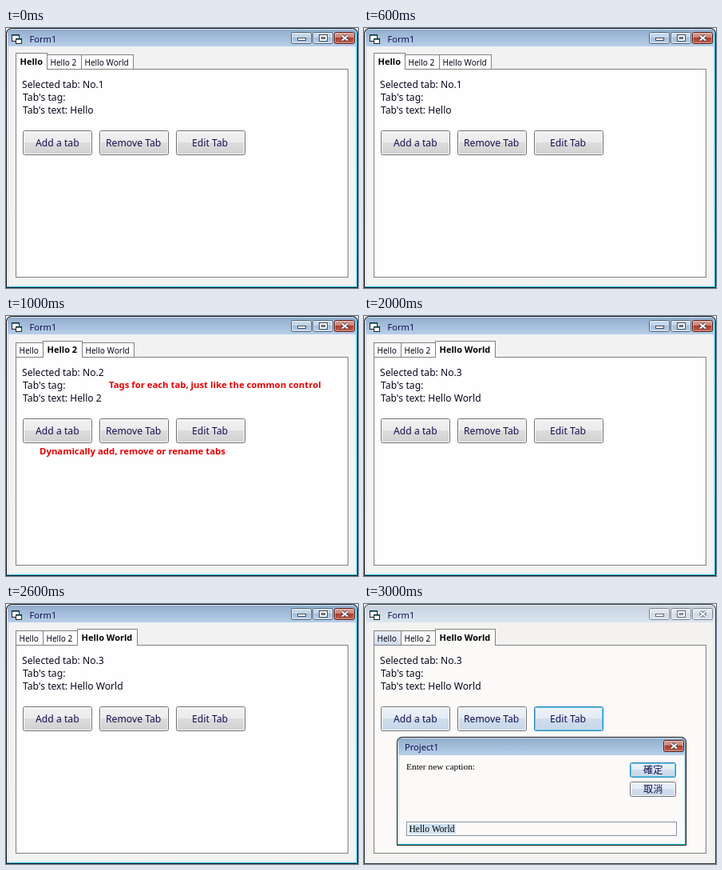
An HTML page with a canvas for the animation above (4 s loop, 441 by 325 pixels).

```html
<!DOCTYPE html>
<html lang="en">
<head>
<meta charset="utf-8">
<title>Tab control demo</title>
<style>
  html, body { margin: 0; width: 100%; height: 100%; overflow: hidden; background: #fff; }
  canvas { display: block; width: 441px; height: 325px; }
</style>
</head>
<body>
<canvas id="stage" width="441" height="325"></canvas>
<script>
const ctx = document.getElementById('stage').getContext('2d');
const SANS = '"Noto Sans", "Open Sans", sans-serif';
const SERIF = '"Liberation Serif", serif';
const CJK = '"Noto Sans CJK TC", "Noto Sans CJK", sans-serif';
const NAVY = '#14104f', INK = '#08081c', RED = '#e60000', CYAN = '#33d2ef';
const GREY_FACE = ['#f2f2f2', '#ebebeb', '#dddddd', '#d0d0d0'];
const BLUE_FACE = ['#eff3f8', '#e4ebf4', '#d1deed', '#c6d6e9'];
const STEP = 1000, LOOP = 4000;
const LABELS = ['Hello', 'Hello 2', 'Hello World'];
const TAB_EDGES = [
  [12, 51, 94, 159],
  [12, 46, 95, 160],
  [12, 46, 89, 164]
];

function rect(x, y, w, h, fill) {
  ctx.fillStyle = fill;
  ctx.fillRect(x, y, w, h);
}

function frame(x, y, w, h, color) {
  ctx.strokeStyle = color;
  ctx.lineWidth = 1;
  ctx.strokeRect(x + 0.5, y + 0.5, w - 1, h - 1);
}

function roundPath(x, y, w, h, r) {
  ctx.beginPath();
  ctx.roundRect(x + 0.5, y + 0.5, w - 1, h - 1, r);
}

function gradient(y, h, ...stops) {
  const g = ctx.createLinearGradient(0, y, 0, y + h);
  stops.forEach(([at, color]) => g.addColorStop(at, color));
  return g;
}

function glossy(y, h, [a, b, c, d]) {
  return gradient(y, h, [0, a], [0.48, b], [0.48, c], [1, d]);
}

function text(str, x, y, size, color = INK, family = SANS, weight = 400) {
  ctx.font = `${weight} ${size}px ${family}`;
  ctx.fillStyle = color;
  ctx.fillText(str, x, y);
}

function windowFrame(x, y, w, h, title, active, client) {
  const body = active
    ? gradient(y, h, [0, '#8eabcb'], [24 / h, '#b9d1ea'], [1, '#d3e2f2'])
    : gradient(y, h, [0, '#c5d1de'], [24 / h, '#dce6f1'], [1, '#e6edf5']);
  roundPath(x, y, w, h, [6, 6, 0, 0]);
  ctx.fillStyle = body;
  ctx.fill();
  rect(x + 6, y + 1, w - 12, 1, active ? '#dfeaf5' : '#f3f6fa');
  rect(x + 1, y + 6, 1, h - 7, '#f5f9fd');
  const edge = active ? CYAN : '#eef3f8';
  rect(x + w - 2, y + 6, 1, h - 7, edge);
  rect(x + 1, y + h - 2, w - 2, 1, edge);
  rect(x + 3, y + 23, w - 6, h - 26, client);
  roundPath(x, y, w, h, [6, 6, 0, 0]);
  ctx.strokeStyle = active ? '#111' : '#333';
  ctx.lineWidth = 1;
  ctx.stroke();
  text(title[0], title[1], title[2], 11.1, NAVY);
}

function captionButton(x, y, w, h, kind, active) {
  const red = kind === 'close' && active;
  const face = red ? ['#dfaaa0', '#cb7b6e', '#ab3a2b', '#c2634f']
    : active ? ['#cfdfef', '#bcd1e7', '#a4bdd8', '#bcd3e9']
    : ['#e6ecf3', '#dbe3ed', '#ced9e5', '#dbe5ef'];
  roundPath(x, y, w, h, 2);
  ctx.fillStyle = glossy(y, h, face);
  ctx.fill();
  ctx.lineWidth = 1;
  ctx.strokeStyle = red ? '#4e1c1c' : active ? '#4f6178' : '#78838f';
  ctx.stroke();
  roundPath(x + 1, y + 1, w - 2, h - 2, 1);
  ctx.strokeStyle = red ? 'rgba(255,225,215,.5)' : 'rgba(255,255,255,.55)';
  ctx.stroke();

  const cx = Math.floor(x + w / 2), cy = Math.floor(y + h / 2);
  const ink = active ? '#454957' : '#626a74';
  if (kind === 'min') {
    rect(cx - 5, cy, 11, 4, ink);
    rect(cx - 4, cy + 1, 9, 2, '#fff');
  } else if (kind === 'max') {
    rect(cx - 5, cy - 4, 11, 9, ink);
    rect(cx - 4, cy - 3, 9, 7, '#fff');
    rect(cx - 2, cy - 1, 5, 3, ink);
    rect(cx - 1, cy, 3, 1, face[2]);
  } else {
    for (const [color, width] of [[ink, 4.2], ['#fff', 2]]) {
      ctx.strokeStyle = color;
      ctx.lineWidth = width;
      ctx.beginPath();
      ctx.moveTo(cx - 3, cy - 2.5);
      ctx.lineTo(cx + 4, cy + 3.5);
      ctx.moveTo(cx + 4, cy - 2.5);
      ctx.lineTo(cx - 3, cy + 3.5);
      ctx.stroke();
    }
  }
}

function formIcon() {
  for (const [x, y, w, h] of [[7, 8, 10, 9], [12, 13, 8, 7]]) {
    rect(x, y, w, h, '#222');
    rect(x + 1, y + 1, w - 2, h - 2, '#fff');
    rect(x + 1, y + 1, w - 2, 1, '#2c8c9c');
  }
}

function button(x, y, w, h, label, tx, ty, face, focused, family = SANS) {
  roundPath(x, y, w, h, 2);
  ctx.fillStyle = glossy(y, h, face);
  ctx.fill();
  ctx.lineWidth = 1;
  ctx.strokeStyle = focused ? '#3c7fb1' : '#707070';
  ctx.stroke();
  roundPath(x + 1, y + 1, w - 2, h - 2, 1);
  ctx.strokeStyle = focused ? '#55cdf0' : '#fafafa';
  ctx.stroke();
  text(label, tx, ty, 12.2, NAVY, family, family === CJK ? 500 : 400);
}

function tabs(selected, page, firstTab) {
  frame(12, 51, 417, 261, '#808080');
  rect(13, 52, 415, 259, page);
  const edges = TAB_EDGES[selected];
  LABELS.forEach((label, i) => {
    const on = i === selected;
    const x = edges[i], w = edges[i + 1] - x + 1, top = on ? 31 : 33;
    rect(x, top, w, 52 - top, '#808080');
    rect(x + 1, top + 1, w - 2, (on ? 52 : 51) - top - 1, i ? page : firstTab);
  });
  LABELS.forEach((label, i) => {
    if (i === selected) text(label, edges[i] + 5.5, 46, 11, '#000', SANS, 700);
    else text(label, edges[i] + 4.4, 47, 10.1);
  });
}

function dialog(client) {
  windowFrame(41, 166, 363, 136, ['Project1', 51, 183], true, client);
  captionButton(375, 170, 26, 15, 'close', true);
  text('Enter new caption:', 53, 207, 11.4, '#000', SERIF);
  button(333, 198, 58, 19, '確定', 350, 212, BLUE_FACE, true, CJK);
  button(333, 222, 58, 19, '取消', 350, 236, BLUE_FACE, false, CJK);
  rect(53, 272, 339, 18, client);
  frame(53, 272, 339, 18, '#8493a3');
  rect(56, 275, 59, 12, '#cfe1ef');
  text('Hello World', 56.5, 285, 11.5, '#000', SERIF);
}

function draw(step) {
  const asking = step === 3;
  const selected = Math.min(step, 2);
  const page = asking ? '#fbfaf8' : '#fefefe';
  const face = asking ? BLUE_FACE : GREY_FACE;
  const firstTab = asking ? gradient(34, 17, [0, '#eaf0f8'], [1, '#d0ddee']) : page;

  rect(0, 0, 441, 325, '#fff');
  windowFrame(0, 0, 441, 325, ['Form1', 29.5, 18], !asking, asking ? '#f3f2f0' : '#f2f2f2');
  formIcon();
  ['min', 'max', 'close'].forEach((kind, i) =>
    captionButton(357 + i * 27, 5, 26, 15, kind, !asking));

  tabs(selected, page, firstTab);
  text(`Selected tab: No.${selected + 1}`, 20, 75, 12.1);
  text("Tab's tag:", 21, 91, 12.2);
  text(`Tab's text: ${LABELS[selected]}`, 21, 107, 12.1);

  button(21, 128, 87, 31, 'Add a tab', 37, 148, face, false);
  button(117, 128, 87, 31, 'Remove Tab', 125, 148, face, false);
  button(213, 128, 87, 31, 'Edit Tab', 233, 148, face, asking);

  if (step === 1) {
    text('Tags for each tab, just like the common control', 129, 90, 11.33, RED, SANS, 700);
    text('Dynamically add, remove or rename tabs', 42, 173, 11.38, RED, SANS, 700);
  }
  if (asking) dialog(page);
}

const start = performance.now();
function tick() {
  const t = (performance.now() - start) % LOOP;
  draw(Math.floor(t / STEP));
  requestAnimationFrame(tick);
}
tick();
</script>
</body>
</html>
```
